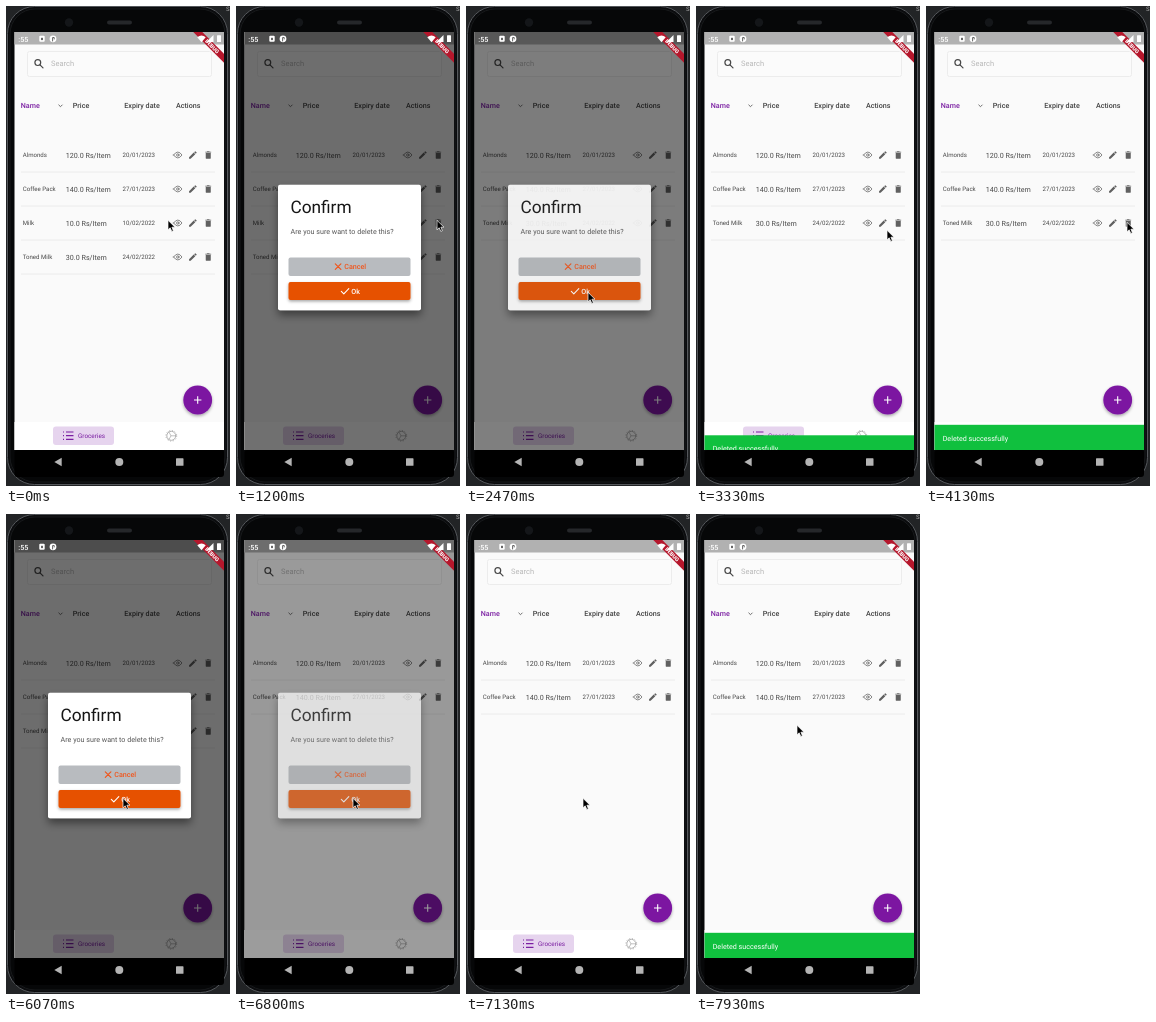
An HTML page that plays this animation: 224x480 px, repeating every 8 s.

```html
<!DOCTYPE html>
<html lang="en">
<head>
<meta charset="utf-8">
<title>Groceries</title>
<style>
  html, body { margin: 0; width: 100%; height: 100%; overflow: hidden; background: #222426; }
  svg { display: block; width: 100%; height: 100%; }
  text { font: 7.15px Roboto, sans-serif; fill: #484848; text-rendering: geometricPrecision; }
  .head { font-weight: 500; fill: #404040; }
  .small { font-size: 6.1px; }
  .line { fill: none; stroke-linecap: round; stroke-linejoin: round; }
</style>
</head>
<body>
<svg viewBox="0 0 224 480">
  <defs>
    <clipPath id="screen"><rect x="8.5" y="26" width="209.5" height="418"/></clipPath>
    <filter id="soft" x="-20%" y="-20%" width="140%" height="150%">
      <feDropShadow dx="0" dy="1.5" stdDeviation="1.6" flood-opacity=".35"/>
    </filter>
    <filter id="deep" x="-20%" y="-20%" width="140%" height="150%">
      <feDropShadow dx="0" dy="5" stdDeviation="4.5" flood-opacity=".45"/>
    </filter>
    <g id="actions" fill="#606060">
      <g class="line" stroke="#686868" stroke-width=".8">
        <path d="M167.6 0Q171.8 -6 176 0Q171.8 6 167.6 0Z"/>
        <circle cx="171.8" r="1.2"/>
      </g>
      <path transform="translate(181.8 -5) scale(.42)" d="M3 17.25V21h3.75L17.8 9.9l-3.75-3.75zM20.7 7a1 1 0 0 0 0-1.4l-2.3-2.3a1 1 0 0 0-1.4 0l-1.9 1.8 3.8 3.8z"/>
      <path transform="translate(197.2 -5) scale(.42)" d="M6 19a2 2 0 0 0 2 2h8a2 2 0 0 0 2-2V7H6zM19 4h-3.5l-1-1h-5l-1 1H5v2h14z"/>
    </g>
  </defs>

  <!-- phone body -->
  <rect x="1.5" y=".5" width="220" height="478" rx="27" fill="#0b0c0e" stroke="#55585c"/>
  <rect x="4" y="3" width="215" height="473" rx="25" fill="#060708" stroke="#17191b"/>
  <rect x="101" y="14.5" width="25" height="4" rx="2" fill="#25272a"/>
  <circle cx="63" cy="16.5" r="4.2" fill="#141619"/>
  <text x="220" y="5" class="small" style="fill:#aaa">S</text>
  <rect x="8.5" y="444" width="209.5" height="27" rx="3" fill="#000"/>
  <g fill="#b4b4b4">
    <path d="M48.3 456L55.7 451.8V460.2Z"/>
    <circle cx="113.3" cy="456" r="4"/>
    <rect x="170" y="452.3" width="7.5" height="7.5" rx=".6"/>
  </g>

  <g clip-path="url(#screen)">
    <rect x="8" y="26" width="210" height="418" fill="#fafafa"/>
    <rect x="8" y="26" width="210" height="12.5" fill="#b1b1b1"/>

    <rect x="21.5" y="45.5" width="184" height="25" rx="2" fill="#fbfbfb" stroke="#ececec"/>
    <g class="line" stroke="#484848" stroke-width="1.2">
      <circle cx="31.8" cy="56.6" r="2.9"/><path d="M34 58.8L37 61.8"/>
    </g>
    <text x="45" y="60.4" style="font-size:7.5px;fill:#b8b8b8">Search</text>

    <text x="14.8" y="102.3" class="head" style="fill:#7b1fa2">Name</text>
    <path d="M52.8 99L54.5 100.7L56.2 99" class="line" stroke="#6a6a6a"/>
    <text x="66.8" y="102.3" class="head">Price</text>
    <text x="118.3" y="102.3" class="head">Expiry date</text>
    <text x="170" y="102.3" class="head">Actions</text>
    <g id="rows"></g>

    <rect x="8" y="416" width="210" height="28" fill="#fff"/>
    <rect x="47" y="420.5" width="61" height="18.5" rx="3" fill="#e6d4ee"/>
    <path d="M57 426h1m2 0h7.5M57 429.7h1m2 0h7.5M57 433.4h1m2 0h7.5" stroke="#7b1fa2" stroke-width="1.2"/>
    <text x="72" y="432" style="font-size:6.35px;fill:#7b1fa2">Groceries</text>
    <g class="line" stroke="#b2b2b2">
      <circle cx="165.3" cy="429.8" r="4.5"/>
      <circle cx="165.3" cy="429.8" r="5.4" stroke-dasharray="1 1.83" stroke-linecap="butt"/>
      <path d="M162.8 425.8L165 429.8L162.8 433.8M165 429.8H169.8" stroke-width=".8"/>
    </g>
    <circle cx="191.7" cy="394" r="14.4" fill="#7b16a1" filter="url(#soft)"/>
    <path d="M188 394h7.4M191.7 390.3v7.4" stroke="#fff" stroke-width="1.1"/>

    <rect id="scrim" x="8" y="26" width="210" height="418"/>

    <g id="dialog">
      <rect x="42" y="178.7" width="143" height="125.5" rx="2" fill="#fff" filter="url(#deep)"/>
      <text x="54.4" y="207" style="font-size:17.3px;fill:#161616">Confirm</text>
      <text x="54.6" y="227.7" style="fill:#555">Are you sure want to delete this?</text>
      <rect x="52.5" y="251.5" width="122" height="18.5" rx="2" fill="#b8bbbf"/>
      <path d="M99.3 257.8l5.6 5.6m0-5.6l-5.6 5.6" class="line" stroke="#f0561d" stroke-width="1.2"/>
      <text x="108.3" y="263.2" style="font-weight:500;fill:#f0561d">Cancel</text>
      <rect x="52.5" y="276" width="122" height="18" rx="2" fill="#e65100" filter="url(#soft)"/>
      <path d="M105.3 285.4l2.5 2.5l5-5.2" class="line" stroke="#fff" stroke-width="1.1"/>
      <text x="115.3" y="287.7" style="font-weight:500;fill:#fff">Ok</text>
    </g>

    <g id="snack">
      <rect x="8" y="418.8" width="210" height="25.2" fill="#10c03e"/>
      <text x="16.7" y="434.7" style="fill:#fff">Deleted successfully</text>
    </g>

    <g transform="translate(219 27.5) rotate(45)">
      <rect x="-24" y="15" width="48" height="6.4" fill="#b5172c"/>
      <text y="20.1" text-anchor="middle" style="font-size:5.4px;font-weight:900;fill:#fff">DEBUG</text>
    </g>

    <!-- system icons stay bright above the dimmed page -->
    <g fill="#fff">
      <text x="12.3" y="35.6" style="font-weight:500;fill:#fff">:55</text>
      <rect x="33.3" y="29.8" width="5.4" height="6" rx="1"/>
      <circle cx="47" cy="32.8" r="3.4"/>
      <path d="M191.3 31.2Q195.5 27.6 199.7 31.2L195.5 36.2Z"/>
      <path d="M207.5 29V36H200.5Z"/>
      <rect x="211" y="29.2" width="4" height="6.8" rx=".6"/>
    </g>
    <rect x="35" y="31.8" width="2" height="2.3" fill="#666"/>
    <path d="M46.6 35V31.5H48.2V33" class="line" stroke="#666"/>
  </g>

  <path id="cursor" d="M0 .3V9.8L2.2 7.8L3.8 11.4L5.4 10.7L3.9 7.2H7Z" fill="#000" stroke="#fff" stroke-width=".7"/>
</svg>
<script>
const LOOP = 8000;
const $ = id => document.getElementById(id);
const items = [
  ["Almonds", "120.0", "20/01/2023"],
  ["Coffee Pack", "140.0", "27/01/2023"],
  ["Milk", "10.0", "10/02/2022", 2450],
  ["Toned Milk", "30.0", "24/02/2022", 6740],
];
// time, x, y of the pointer tip
const path = [
  [70, 162, 214], [470, 201, 214], [1200, 201, 214], [1600, 152, 277],
  [1800, 102, 286], [1930, 122, 286], [3000, 122, 286], [3330, 191, 224],
  [3870, 201, 216], [4400, 201, 216], [4930, 115, 287], [5000, 115, 287],
  [5670, 117, 284], [7270, 117, 284], [7900, 101, 211],
];

$("rows").innerHTML = items.map(([name, price, date]) => `<g>
  <text x="16.7" y="2.2" class="small">${name}</text>
  <text x="59.8" y="2.5">${price} Rs/Item</text>
  <text x="116.6" y="2.2" class="small">${date}</text>
  <use href="#actions"/>
  <path d="M15 17H209" stroke="#e7e7e7" stroke-width=".8"/></g>`).join("");
const rows = [...$("rows").children];

const ramp = (t, start, length) => Math.min(1, Math.max(0, (t - start) / length));
const smooth = u => u * u * (3 - 2 * u);
const easeOut = u => 1 - (1 - u) ** 2;
const shown = (t, open, close) => ramp(t, open, 200) - ramp(t, close, 200);

function pointer(t) {
  const i = path.findIndex(p => p[0] > t);
  if (i < 1) return (i ? path[path.length - 1] : path[0]).slice(1);
  const [a, b] = [path[i - 1], path[i]];
  const u = smooth(ramp(t, a[0], b[0] - a[0]));
  return [a[1] + (b[1] - a[1]) * u, a[2] + (b[2] - a[2]) * u];
}

function draw(t) {
  let y = 149;
  items.forEach(([, , , gone = LOOP], i) => {
    const live = t < gone;
    rows[i].setAttribute("visibility", live ? "visible" : "hidden");
    rows[i].setAttribute("transform", `translate(0 ${y})`);
    if (live) y += 34;
  });

  const open = t < 3000 ? shown(t, 870, 2450) : shown(t, 4200, 6740);
  $("scrim").setAttribute("opacity", .56 * open);
  $("dialog").setAttribute("opacity", open);

  const rise = t < 5450 ? easeOut(ramp(t, 3260, 200))
    : t < 7000 ? 1 - smooth(ramp(t, 5450, 150))
    : easeOut(ramp(t, 7320, 200));
  $("snack").setAttribute("transform", `translate(0 ${25.2 * (1 - rise)})`);
  $("cursor").setAttribute("transform", `translate(${pointer(t)})`);
}

function tick() {
  draw(performance.now() % LOOP);
  requestAnimationFrame(tick);
}
tick();
</script>
</body>
</html>
```
